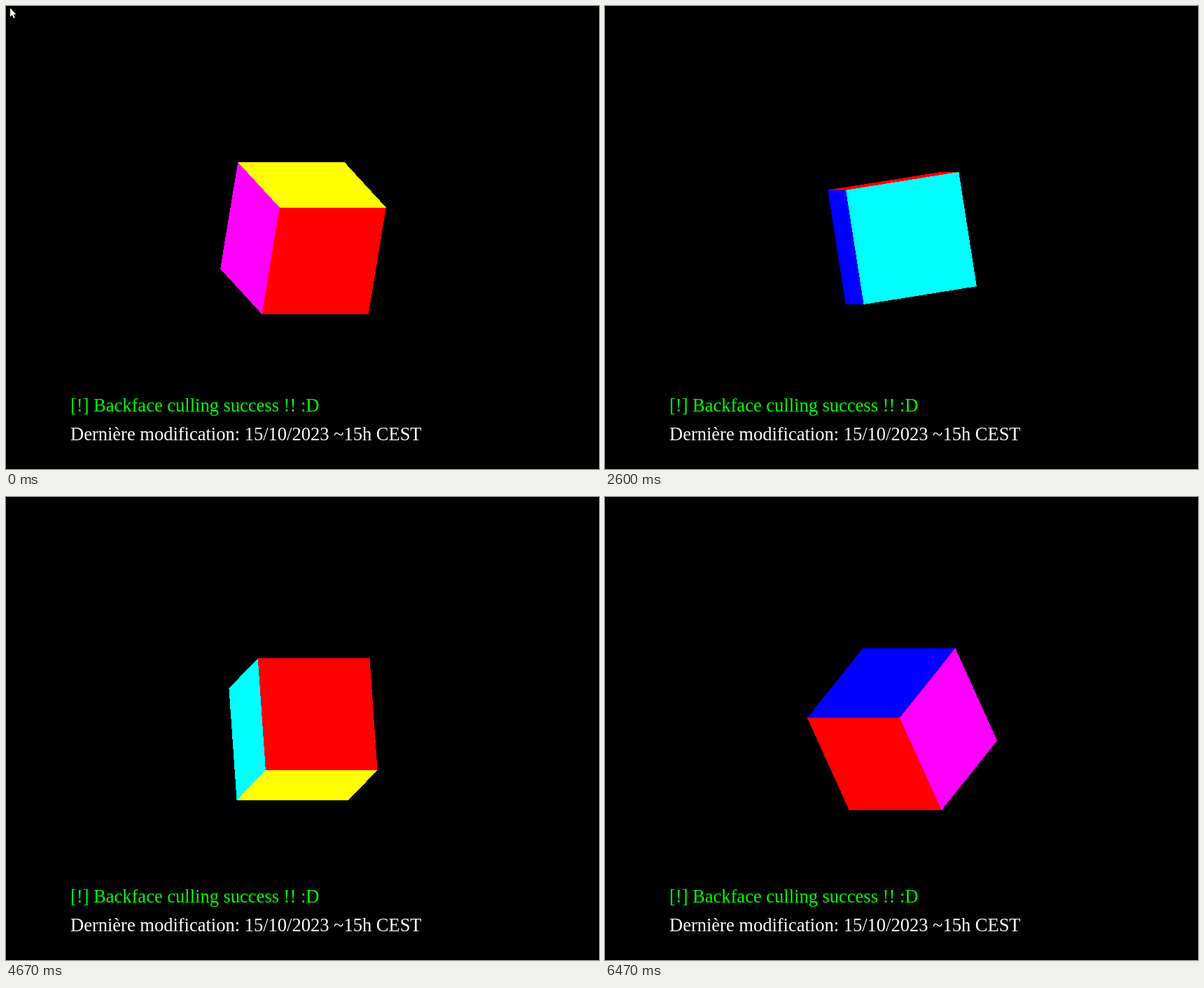
Animation, 847 px wide and 661 px high, one loop 6.59 s. Source, as an HTML page:

```html
<!DOCTYPE html>
<html lang="fr">
<head>
<meta charset="utf-8">
<title>Backface culling</title>
<style>
  html, body { margin: 0; width: 100%; height: 100%; overflow: hidden; background: #000; }
  svg { display: block; }
  text { font: 26.5px "Liberation Serif", "Times New Roman", serif; font-variant-ligatures: none; }
</style>
</head>
<body>
<svg width="847" height="661" viewBox="0 0 847 661">
  <g id="cube" shape-rendering="crispEdges">
    <polygon/><polygon/><polygon/>
  </g>
  <text x="92" y="579" fill="#0f0">[!] Backface culling success !! :D</text>
  <text x="92" y="620" fill="#fff">Dernière modification: 15/10/2023 ~15h CEST</text>
  <path id="cursor" d="M6 3V15.2L8.8 12.6L11 17.4L12.8 16.5L10.7 11.9H14.4Z" fill="#fff"/>
</svg>
<script>
const LOOP = 6590, SIZE = 165.3, CX = 424.5, CY = 331.5;
const polygons = document.querySelectorAll('#cube polygon');
const cursor = document.getElementById('cursor');

function drawFace(polygon, color, normal, sign, p, q) {
  const corners = [[-1, -1], [1, -1], [1, 1], [-1, 1]].map(([a, b]) => [
    CX + SIZE / 2 * (sign * normal[0] + a * p[0] + b * q[0]),
    CY + SIZE / 2 * (sign * normal[1] + a * p[1] + b * q[1])
  ]);
  polygon.setAttribute('points', corners.join(' '));
  polygon.setAttribute('fill', color);
}

// The cube advances 4 degrees every 100 ms, shown at 15 pictures a second.
function angleAt(t) {
  const tick = Math.floor((t + 5) * 0.015);
  let step = Math.floor(tick * 2 / 3 + 0.5);
  if (step > 55) step -= 5; // the rotation jumps back once
  return (23 - 4 * step) * Math.PI / 180;
}

function draw(t) {
  const angle = angleAt(t), s = Math.sin(angle), c = Math.cos(angle);
  // Projected axes: red, yellow/blue and cyan/magenta normals
  const u = [s * c, s], v = [s * s, -c], w = [c, 0];
  const vSign = s * c > 0 ? 1 : -1, wSign = s < 0 ? 1 : -1;
  drawFace(polygons[0], '#f00', u, 1, v, w);
  drawFace(polygons[1], vSign > 0 ? '#ff0' : '#00f', v, vSign, u, w);
  drawFace(polygons[2], wSign > 0 ? '#0ff' : '#f0f', w, wSign, u, v);
  cursor.style.display = t < 130 ? '' : 'none';
}

const start = performance.now();
function tick() {
  draw((performance.now() - start) % LOOP);
  requestAnimationFrame(tick);
}
tick();
</script>
</body>
</html>
```
